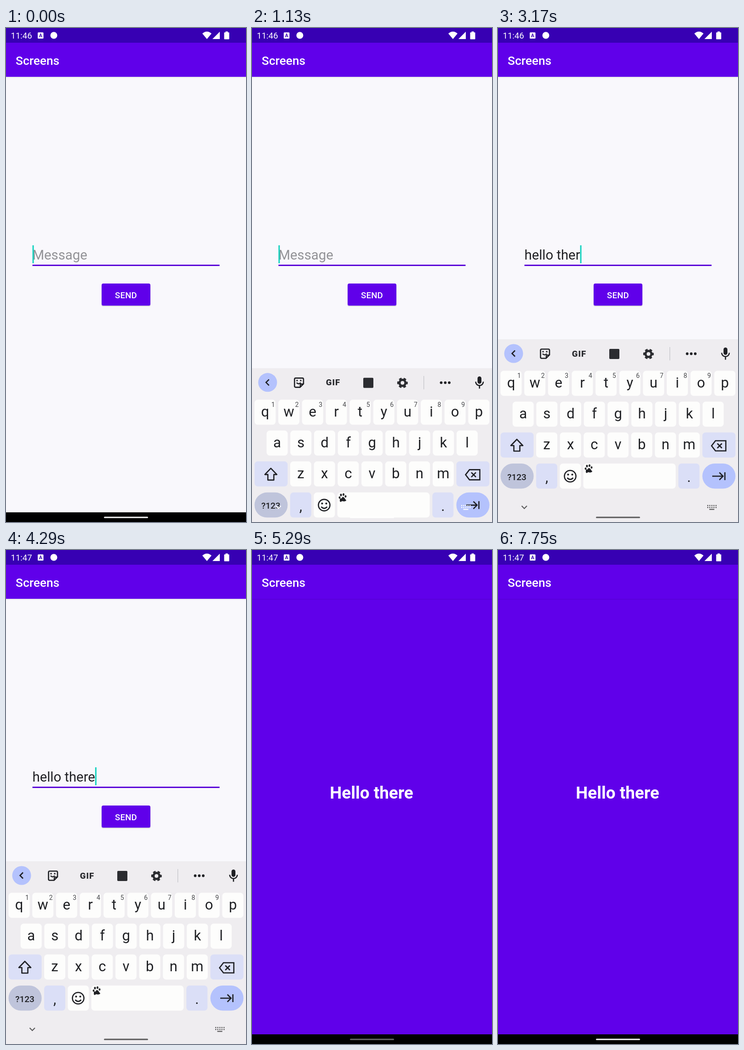
An HTML page that plays this animation: 522 px wide and 1073 px high, repeating every 7.92 s.

```html
<!DOCTYPE html>
<html lang="en">
<head>
<meta charset="utf-8">
<title>Screens</title>
<style>
  html, body { margin: 0; width: 100%; height: 100%; overflow: hidden; background: #f9f8fc; }
  svg { display: block; width: 522px; height: 1073px; font-family: Roboto, sans-serif; }
  text { white-space: pre; }
  .mid { text-anchor: middle; }
  .line { fill: none; stroke: #1f2024; stroke-width: 2.6; }
  .title { font-size: 26.3px; font-weight: 500; fill: #fff; }
  .letter { font-size: 31px; fill: #1f2024; }
  .hint { font-size: 14px; fill: #45464a; }
</style>
</head>
<body>
<svg viewBox="0 0 522 1073">
  <g id="compose">
    <rect width="522" height="1073" fill="#f9f8fc"/>
    <rect y="106" width="522" height="2" opacity=".07"/>
    <rect width="522" height="106" fill="#6000ea"/>
    <rect width="522" height="32" fill="#3700b3"/>
    <text class="title" x="21" y="80">Screens</text>
    <text id="field" x="57.5" y="503" font-size="29.3"></text>
    <rect id="cursor" y="472" width="3" height="39" fill="#16d3bf"/>
    <rect x="57.5" y="514" width="407" height="3" fill="#5b08d8"/>
    <rect x="207.5" y="557" width="107" height="48" rx="4" opacity=".12"/>
    <rect x="208" y="555" width="106" height="48" rx="3.5" fill="#6000ea"/>
    <text class="mid" x="261" y="586.5" font-size="18.6" font-weight="500" letter-spacing=".2" fill="#fff">SEND</text>
    <rect y="1052" width="522" height="21"/>

    <g id="keyboard">
      <rect y="676" width="522" height="420" fill="#efedf0"/>
      <g id="keys"></g>

      <!-- toolbar -->
      <circle cx="34" cy="707" r="20.5" fill="#b4c2fd"/>
      <path class="line" d="M37 700.5l-6.5 6.5 6.5 6.5"/>
      <path class="line" d="M95 697.500h14.500q2.500 0 2.500 2.500v10l-7.500 7.500h-9.500q-2.500 0-2.500-2.500v-15q0-2.500 2.500-2.500zM111.500 710.500h-4q-2.500 0-2.500 2.500v4M97 707.500q4.500 5 9 0"/>
      <path d="M96.500 701.500h3v3h-3zM104.500 701.500h3v3h-3z" fill="#1f2024"/>
      <text class="mid" x="176.500" y="713.500" font-size="18.500" font-weight="900" letter-spacing="1" fill="#2b2c30">GIF</text>
      <rect x="242" y="697" width="22" height="22" rx="2" fill="#2b2c30"/>
      <circle cx="327.300" cy="708" r="6.500" fill="none" stroke="#2b2c30" stroke-width="5"/>
      <circle cx="327.300" cy="708" r="9.700" fill="none" stroke="#2b2c30" stroke-width="3.600" stroke-dasharray="5.700 4.457" stroke-dashoffset="2.850"/>
      <rect x="373" y="693" width="1.300" height="29" fill="#c4c4c9"/>
      <g fill="#1f2024">
        <circle cx="411.500" cy="707.500" r="2.900"/><circle cx="420.300" cy="707.500" r="2.900"/><circle cx="429" cy="707.500" r="2.900"/>
        <rect x="490.500" y="694" width="8.500" height="16" rx="4.250"/>
      </g>
      <path class="line" d="M486.500 705.500a8.300 8.300 0 0 0 16.600 0M494.800 714v6.500"/>

      <!-- key icons -->
      <path class="line" d="M41 893.500l13 13.500h-6.500v12h-13v-12h-6.500z" stroke-linejoin="round"/>
      <path class="line" d="M473 896.500h22.500v22h-22.500l-8.500-11zM477 902.500l10 10M487 902.500l-10 10"/>
      <circle class="line" cx="157" cy="973.500" r="12.500"/>
      <path class="line" d="M150.500 977q6.500 7 13 0"/>
      <circle cx="152.500" cy="970" r="2.100" fill="#1f2024"/><circle cx="161.500" cy="970" r="2.100" fill="#1f2024"/>
      <path class="line" d="M466 973.500h23M481.500 965.500l8 8-8 8M493.500 965v17"/>
      <g fill="#1f2024">
        <path d="M197 955.500q3 .5 4.500 3t3 4-2 2.500-4.500 0-4 1-3-3 2-4 4-3.500z"/>
        <ellipse cx="190.500" cy="957" rx="2" ry="2.600"/><ellipse cx="193.500" cy="951.500" rx="2" ry="2.800"/>
        <ellipse cx="199" cy="950.500" rx="2" ry="2.800"/><ellipse cx="203.500" cy="954.500" rx="2" ry="2.600"/>
      </g>
    </g>
  </g>

  <g id="reader">
    <rect width="522" height="1073" fill="#6000ea"/>
    <rect y="106" width="522" height="2" opacity=".07"/>
    <rect width="522" height="32" fill="#3700b3"/>
    <text class="title" x="21" y="80">Screens</text>
    <text class="mid" x="260" y="540" font-size="36.800" font-weight="700" fill="#fff">Hello there</text>
    <rect y="1052" width="522" height="21"/>
  </g>

  <!-- system overlays -->
  <g fill="#fff">
    <text id="clock" x="10.500" y="23" font-size="18.500"></text>
    <rect x="69" y="9.500" width="12.500" height="13.500" rx="1.500"/>
    <text class="mid" x="75.300" y="20" font-size="10.500" font-weight="700" fill="#3700b3">A</text>
    <circle cx="104" cy="16" r="7.500"/>
    <path d="M427 12q10-8.500 20 0l-10 12zM449 24l16-16v16zM475.500 9.500h2v-2h5v2h2q1 0 1 1v13q0 1-1 1h-9q-1 0-1-1v-13q0-1 1-1z"/>
  </g>
  <g id="nav">
    <rect x="213" y="1061.500" width="96" height="3" rx="1.500"/>
    <g id="navKeys">
      <path d="M51.500 1038l5.700 5.700 5.700-5.700" fill="none" stroke-width="2.200"/>
      <g id="dots" stroke="none"><rect x="459.500" y="1044.500" width="11" height="2.200"/></g>
    </g>
  </g>
</svg>

<script>
const $ = id => document.getElementById(id);
const LOOP = 7920, MESSAGE = 'hello there';
const KEYBOARD_IN = 1008, TYPE_START = 1250, TYPE_STEP = 200, MINUTE = 3200;
const OPEN = 4724, NAV_DARK = 1530, NAV_LIGHT = 4680;

function add(parent, tag, attrs, label) {
  const el = document.createElementNS('http://www.w3.org/2000/svg', tag);
  for (const name in attrs) el.setAttribute(name, attrs[name]);
  if (label) el.textContent = label;
  parent.append(el);
}

function key(x, y, width, fill, rx = 7) {
  add($('keys'), 'rect', { x, y, width, height: 54.5, rx, fill });
}

function label(text, x, y, cls = 'letter mid') {
  add($('keys'), 'text', { x, y, class: cls }, text);
}

const WHITE = '#fdfdfc', TINT = '#dbdff7', BLUE = '#b4c2fd', PITCH = 51.65;
[['qwertyuiop', 5.5, 744.5], ['asdfghjkl', 31.7, 811.5], ['zxcvbnm', 83, 878.5]].forEach(([row, left, top], r) => {
  [...row].forEach((ch, i) => {
    const x = left + i * PITCH;
    key(x, top, 46, WHITE);
    label(ch, x + 23, top + 36.5);
    if (!r) label((i + 1) % 10, x + 40.5, top + 15.5, 'hint mid');
  });
});
key(5.5, 878.5, 72, TINT);
key(444.5, 878.5, 72, TINT);
key(5.5, 946, 72, '#bfc4db', 27);
key(83, 946, 46, TINT);
key(134.3, 946, 46, WHITE);
key(185.5, 946, 201, WHITE);
key(392.3, 946, 46, TINT);
key(444.5, 946, 72, BLUE, 27);
add($('keys'), 'text', { x: 41, y: 981.5, class: 'mid', 'font-size': 19, 'font-weight': 500, fill: '#1f2024' }, '?123');
label(',', 106, 986);
label('.', 415.3, 986);

for (let i = 0; i < 10; i++)
  add($('dots'), 'rect', { x: 455 + i % 5 * 4.5, y: 1036 + (i > 4) * 4.2, width: 2.4, height: 2.4 });

const clamp = v => Math.min(1, Math.max(0, v));
const bez = (u, a, b, c, d) => (1 - u) ** 3 * a + 3 * u * (1 - u) ** 2 * b + 3 * u * u * (1 - u) * c + u ** 3 * d;

// Each segment: x0, y0, x1, y1, x2, y2, x3, y3
const ease = (...segments) => v => {
  const x = clamp(v);
  const s = segments.find(seg => x <= seg[6]);
  let lo = 0, hi = 1;
  for (let i = 0; i < 24; i++) {
    const u = (lo + hi) / 2;
    if (bez(u, s[0], s[2], s[4], s[6]) < x) lo = u; else hi = u;
  }
  return bez(hi, s[1], s[3], s[5], s[7]);
};
const slideIn = ease([0, 0, .2, 0, 0, 1, 1, 1]);
const standard = ease([0, 0, .4, 0, .2, 1, 1, 1]);
const emphasized = ease([0, 0, .05, 0, .1333, .06, .1667, .4], [.1667, .4, .2083, .82, .25, 1, 1, 1]);

const show = (el, on) => { el.style.display = on ? '' : 'none'; };
const zoom = (el, s) => el.setAttribute('transform', `translate(261 536.5) scale(${s}) translate(-261 -536.5)`);

let shown = null;
function setField(text) {
  if (text === shown) return;
  shown = text;
  const field = $('field');
  field.textContent = text || 'Message';
  field.setAttribute('fill', text ? '#202024' : '#939397');
  $('cursor').setAttribute('x', text ? 57.5 + field.getComputedTextLength() : 57.5);
}

function cursorOn(t) {
  const last = TYPE_START + TYPE_STEP * (MESSAGE.length - 1);
  if (t >= OPEN || (t >= TYPE_START && t < last)) return true;
  return Math.floor((t < TYPE_START ? t : t - last) / 500) % 2 === 0;
}

function render(t) {
  const typed = Math.max(0, Math.floor((t - TYPE_START) / TYPE_STEP) + 1);
  setField(MESSAGE.slice(0, typed));
  show($('cursor'), cursorOn(t));
  $('clock').textContent = t < MINUTE ? '11:46' : '11:47';

  show($('keyboard'), t >= KEYBOARD_IN);
  const drop = 397 * (1 - slideIn((t - KEYBOARD_IN) / 275));
  $('keyboard').setAttribute('transform', `translate(0 ${drop})`);

  const p = emphasized((t - OPEN) / 400);
  zoom($('compose'), 1 + .05 * p);
  zoom($('reader'), .85 + .15 * p);
  $('reader').setAttribute('opacity', clamp((t - OPEN - 50) / 50));

  const dark = standard((t - NAV_DARK) / 1700) - standard((t - NAV_LIGHT) / 1700);
  const grey = Math.round(255 * (1 - dark));
  const tint = `rgba(${grey},${grey},${grey},${.96 - .34 * dark})`;
  $('nav').setAttribute('fill', tint);
  $('nav').setAttribute('stroke', 'none');
  $('navKeys').setAttribute('stroke', tint);
  show($('navKeys'), t >= KEYBOARD_IN && t < OPEN + 120);
}

const start = performance.now();
function tick() {
  render((performance.now() - start) % LOOP);
  requestAnimationFrame(tick);
}
tick();
</script>
</body>
</html>
```
